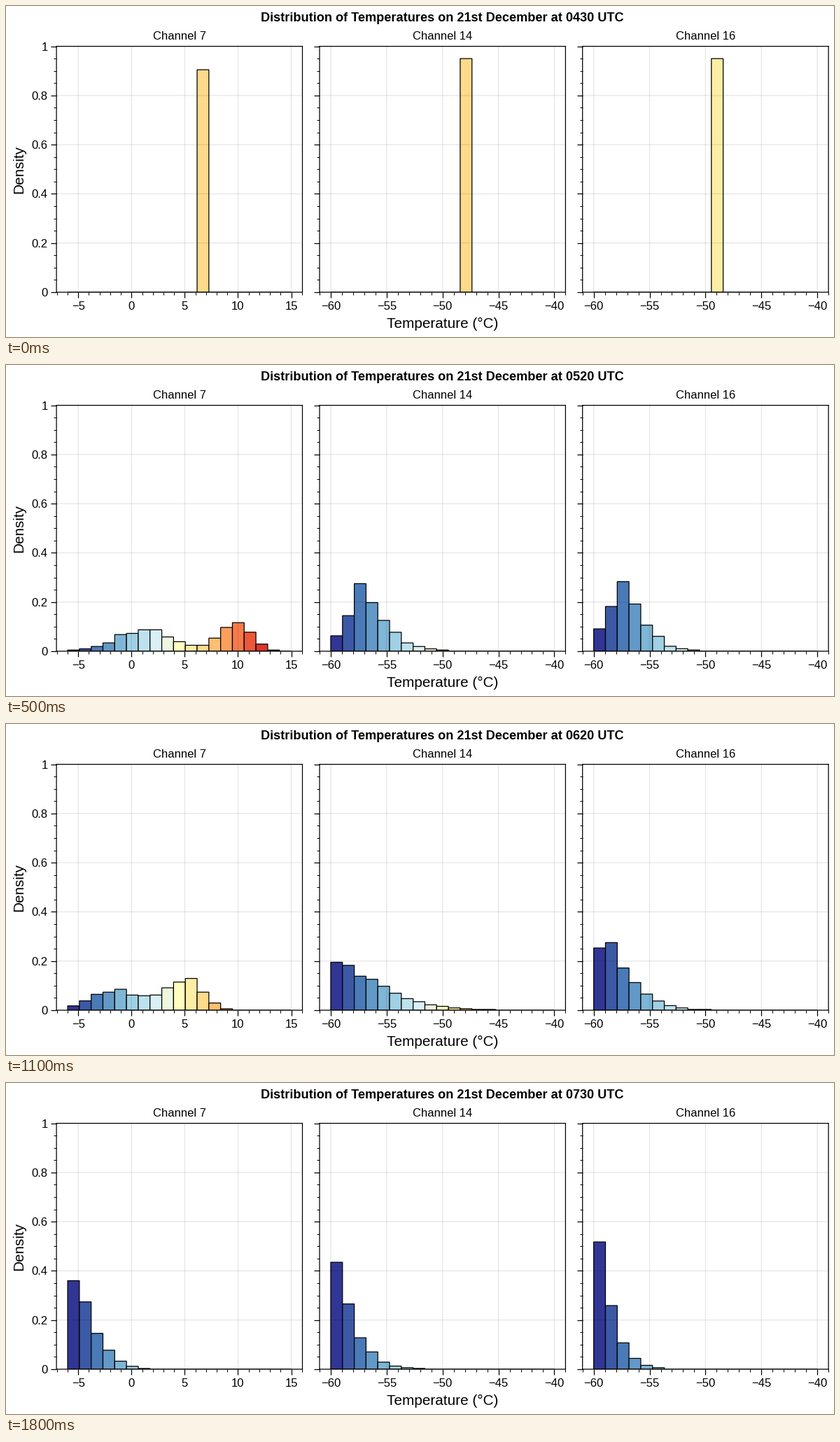
A matplotlib script for the animation above (1900 ms loop, 1183x473 px).

```python
import numpy as np
import matplotlib.pyplot as plt
from matplotlib.animation import FuncAnimation
from matplotlib.ticker import FuncFormatter, MultipleLocator

W, H, DPI = 1183, 473, 128
STEPS, INTERVAL = 19, 100
BINS = 19
CENTERS = np.arange(BINS) + 0.5
TOP, BOTTOM, WIDTH = 57.6, 409.0, 351.4
LINE = 1.25


def two_humps(spread, cold, warm, warm_share):
    """Shortwave channel: a broad cold hump and a narrow warm one."""
    def hump(center, sd):
        sd = sd * spread
        return np.exp(-((CENTERS - center) / sd) ** 2 / 2) / sd
    return (1 - warm_share) * hump(cold, 2.3) + warm_share * hump(warm, 1.4)


def skewed(spread, peak, tail):
    """Longwave channels: a steep cold side and a longer warm tail."""
    d = CENTERS - peak
    scale = spread * np.where(d < 0, 1.6, tail)
    return np.exp(-(np.abs(d) / scale) ** 1.5)


# Shape parameters, in bins, at these steps; in between they move linearly.
KEY_STEPS = (0, 3, 5, 9, 13, 15, 18)
PANELS = [
    ("Channel 7", 72.1, (-6, 15), two_humps, dict(
        cold=(11.5, 7.5, 6.5, 5.3, 3.3, 3.4, -0.6),
        warm=(11.5, 12, 14.2, 11.7, 8.3, 6, 2),
        warm_share=(0.4, 0.4, 0.4, 0.53, 0.5, 0.45, 0))),
    ("Channel 14", 448.0, (-60, -40), skewed, dict(
        peak=(11.5, 3.8, 2.5, 0.6, 0.9, 0.8, -3),
        tail=(4.6, 4.6, 2.7, 4.8, 4.5, 3.7, 3))),
    ("Channel 16", 823.7, (-60, -40), skewed, dict(
        peak=(10.5, 3.2, 2.4, 0.9, 1.2, 0.2, -3),
        tail=(3.8, 3.8, 2.2, 3.4, 2.3, 2.9, 2.5))),
]


def shares_at(step, profile, keys, seed):
    """Share of the pixels in each bin, as whole pixel counts."""
    spread = np.clip(step / 3, 0.05, 1)
    params = {k: np.interp(step, KEY_STEPS, v) for k, v in keys.items()}
    curve = profile(spread, **params)
    pixels = min(1 + 38 * step, 300)
    noise = np.random.default_rng([seed, step]).normal(1, 0.08, BINS)
    counts = np.round(pixels * curve / curve.sum() * noise)
    return counts / counts.sum()


plt.rcParams["font.family"] = "Liberation Sans"
plt.rcParams["path.snap"] = False
fig = plt.figure(figsize=(W / DPI, H / DPI), dpi=DPI, facecolor="white")


def pt(px):
    return px * 72 / DPI


def label(x, y, text, size, **kw):
    return fig.text(x / W, 1 - y / H, text, fontsize=pt(size),
                    ha="center", va="baseline", **kw)


def make_panel(title, left, span, first):
    ax = fig.add_axes([left / W, 1 - BOTTOM / H, WIDTH / W, (BOTTOM - TOP) / H])
    lo, hi = span
    width = (hi - lo) / BINS
    colors = plt.get_cmap("RdYlBu_r")(np.arange(BINS) / (BINS - 1))
    bars = ax.bar(lo + width * np.arange(BINS), np.zeros(BINS), width,
                  align="edge", color=colors, edgecolor="black",
                  linewidth=pt(LINE))
    margin = 0.05 * (hi - lo)
    ax.set_xlim(lo - margin, hi + margin)
    ax.set_ylim(0, 1)
    ax.xaxis.set_major_locator(MultipleLocator(5))
    ax.xaxis.set_minor_locator(MultipleLocator(1))
    ax.yaxis.set_major_locator(MultipleLocator(0.2))
    ax.yaxis.set_minor_locator(MultipleLocator(0.05))
    ax.yaxis.set_major_formatter(FuncFormatter(lambda v, _: f"{v:.1g}"))
    ax.tick_params(which="major", length=pt(8.3), width=pt(LINE),
                   pad=pt(4.2), labelsize=pt(16.6))
    ax.tick_params(which="minor", length=pt(4.2), width=pt(1.0))
    ax.tick_params(axis="y", labelleft=first)
    ax.grid(True, color="black", alpha=0.1, linewidth=pt(LINE), linestyle="-")
    for spine in ax.spines.values():
        spine.set_linewidth(pt(LINE))
    label(left + WIDTH / 2, 48, title, 16.6)
    return bars, width


panels = []
for i, (title, left, span, profile, keys) in enumerate(PANELS):
    panels.append((*make_panel(title, left, span, i == 0), profile, keys))

heading = label(623.5, 21.6, "", 18.1, weight="bold")
label(623.5, 460, "Temperature (°C)", 20.8)
label(24, 233.4, "Density", 20.6, rotation=90, rotation_mode="anchor")


def update(step):
    hours, minutes = divmod(4 * 60 + 30 + 10 * step, 60)
    heading.set_text("Distribution of Temperatures on 21st December "
                     f"at {hours:02d}{minutes:02d} UTC")
    for seed, (bars, width, profile, keys) in enumerate(panels):
        for bar, share in zip(bars, shares_at(step, profile, keys, seed)):
            bar.set_height(share / width)
    return []


anim = FuncAnimation(fig, update, frames=STEPS, interval=INTERVAL, repeat=True)
plt.show()
```
